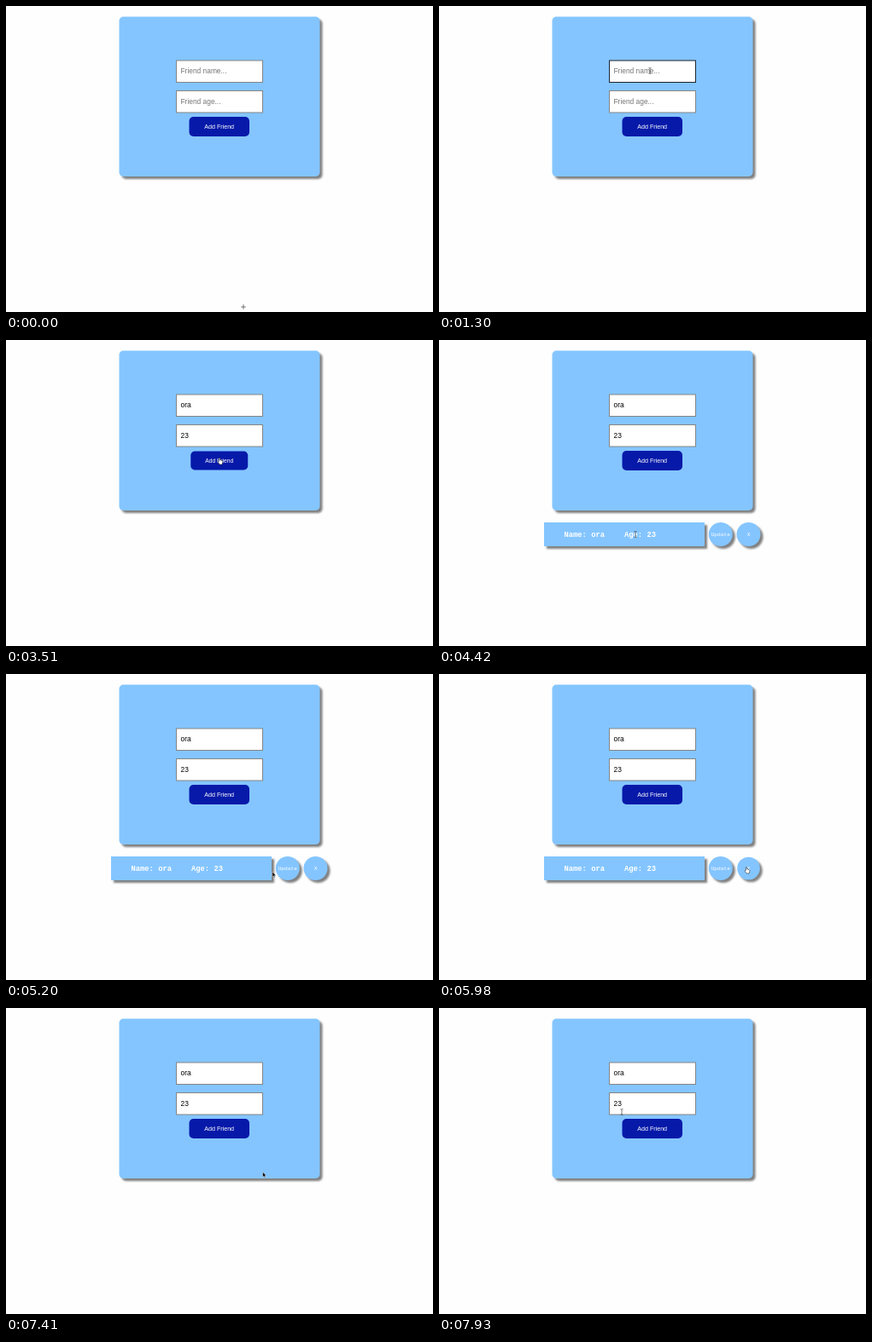
Animation, 500 px wide and 359 px high, one loop 8 s. Source, as an HTML page:

```html
<!DOCTYPE html>
<html lang="en">
<head>
<meta charset="utf-8">
<title>Friend list</title>
<style>
  html, body { margin: 0; width: 100%; height: 100%; overflow: hidden; background: #fefefe; }
  svg { display: block; width: 100vw; height: 100vh; }
  .card { fill: #84c5ff; filter: drop-shadow(3px 3px 1px #808080); }
  .field { fill: #fff; stroke: #858585; }
  .field.focus { stroke: #1c2430; }
  text { font: 8.4px "Liberation Sans", Arial, sans-serif; fill: #000; white-space: pre; }
  text.hint { fill: #757575; }
  .label { font-size: 7.1px; fill: #fff; text-anchor: middle; }
  .mono { font: bold 8.8px "Liberation Mono", "Courier New", monospace; fill: #fff; }
  .mini { font: 6.2px "Liberation Mono", "Courier New", monospace; fill: #fff; text-anchor: middle; }
  .hot { transform-box: fill-box; transform-origin: center; }
  .hot.over { transform: scale(.95); }
</style>
</head>
<body>
<svg viewBox="0 0 500 359">
  <rect class="card" x="132.5" y="12.5" width="235" height="187.5" rx="5"/>
  <rect id="nameBox" class="field" x="199.5" y="64" width="101" height="25.5"/>
  <rect id="ageBox" class="field" x="199.5" y="99.5" width="101" height="25.5"/>
  <text id="name" x="204.5" y="79.3"></text>
  <text id="age" x="204.5" y="114.8"></text>
  <g id="add" class="hot">
    <rect x="214.5" y="130" width="70.5" height="23" rx="5" fill="#0619a9"/>
    <text class="label" x="249.7" y="144.2">Add Friend</text>
  </g>
  <g id="row">
    <rect class="card" x="123" y="214" width="188" height="28"/>
    <text class="mono" x="146.5" y="230.5">Name: ora</text>
    <text class="mono" x="217" y="230.5">Age: 23</text>
    <g id="update" class="hot">
      <circle class="card" cx="329.8" cy="228" r="14"/>
      <text class="mini" x="329.8" y="230">Update</text>
    </g>
    <g id="remove" class="hot">
      <circle class="card" cx="362.5" cy="228" r="14"/>
      <text class="mini" x="362.5" y="230">X</text>
    </g>
  </g>
  <g id="cursor">
    <path id="cross" d="M-2.8 0H2.8M0 -2.8V2.8" stroke="#555" stroke-width=".8"/>
    <path id="arrow" d="M0 -3V3L1.4 1.8L2.3 3.8L3.2 3.4L2.3 1.5H4Z" fill="#000" stroke="#fff" stroke-width=".4"/>
    <path id="beam" d="M-1.5 -3.5Q0 -3.5 0 -2.5Q0 -3.5 1.5 -3.5M0 -2.5V2.5M-1.5 3.5Q0 3.5 0 2.5Q0 3.5 1.5 3.5" fill="none" stroke="#444" stroke-width=".7"/>
    <path id="hand" d="M-1.6 -3.3Q-.8 -4 -.2 -3V-1L2.3 -.4Q3 0 2.8 1.2L2 4H-.8L-2.8 1.2Q-3 0 -1.6 .4Z" fill="#fff" stroke="#111" stroke-width=".5"/>
  </g>
</svg>
<script>
const $ = id => document.getElementById(id);
const LOOP = 8000, STEP = 130;

// Pointer path: time, x, y
const path = [
  [0, 278, 353], [130, 277, 342], [780, 247, 76], [2730, 247, 76],
  [3380, 251, 142], [3640, 251, 142], [4420, 230, 228], [4550, 238, 231],
  [5200, 312, 235], [5460, 340, 232], [5980, 361, 230], [6240, 361, 230],
  [6760, 353, 238], [7020, 343, 231], [7150, 331, 221], [7930, 214, 122], [LOOP, 214, 122]
];

function pointer(t) {
  const i = path.findIndex(p => p[0] > t);
  const [t0, x0, y0] = path[i - 1], [t1, x1, y1] = path[i];
  let k = (t - t0) / (t1 - t0);
  k = k * k * (3 - 2 * k);
  return [x0 + (x1 - x0) * k, y0 + (y1 - y0) * k];
}

const show = (id, on) => $(id).style.display = on ? "" : "none";

function type(id, hint, value, count) {
  $(id).textContent = count ? value.slice(0, count) : hint;
  $(id).classList.toggle("hint", !count);
}

// Number of keys pressed so far
const keys = (t, ...times) => times.filter(k => t >= k).length;

function draw(now) {
  const t = Math.floor(now % LOOP / STEP) * STEP;
  const [x, y] = pointer(t);
  const within = (l, top, r, b) => x >= l && x <= r && y >= top && y <= b;
  const listed = t >= 3640 && t < 6240;
  const typing = t >= 1430 && t < 2860;

  type("name", "Friend name...", "ora", keys(t, 1430, 1690, 1820));
  type("age", "Friend age...", "23", keys(t, 2470, 2730));
  $("nameBox").classList.toggle("focus", t >= 1300 && t < 1950);
  $("ageBox").classList.toggle("focus", t >= 1950 && t < 3380);
  show("row", listed);

  const over = {
    add: !typing && within(214, 130, 285, 153),
    update: listed && Math.hypot(x - 329.8, y - 228) < 14,
    remove: listed && Math.hypot(x - 362.5, y - 228) < 14
  };
  for (const id in over) $(id).classList.toggle("over", over[id]);

  const onText = within(199, 64, 301, 90) || within(199, 99, 301, 125) ||
    listed && (within(146, 222, 194, 233) || within(217, 222, 254, 233));
  const shape = t < 260 ? "cross" : Object.values(over).some(Boolean) ? "hand" : onText ? "beam" : "arrow";
  for (const id of ["cross", "arrow", "beam", "hand"]) show(id, id === shape);
  show("cursor", !typing);
  $("cursor").setAttribute("transform", `translate(${x} ${y})`);
}

const start = performance.now();
function tick() {
  draw(performance.now() - start);
  requestAnimationFrame(tick);
}
tick();
</script>
</body>
</html>
```
